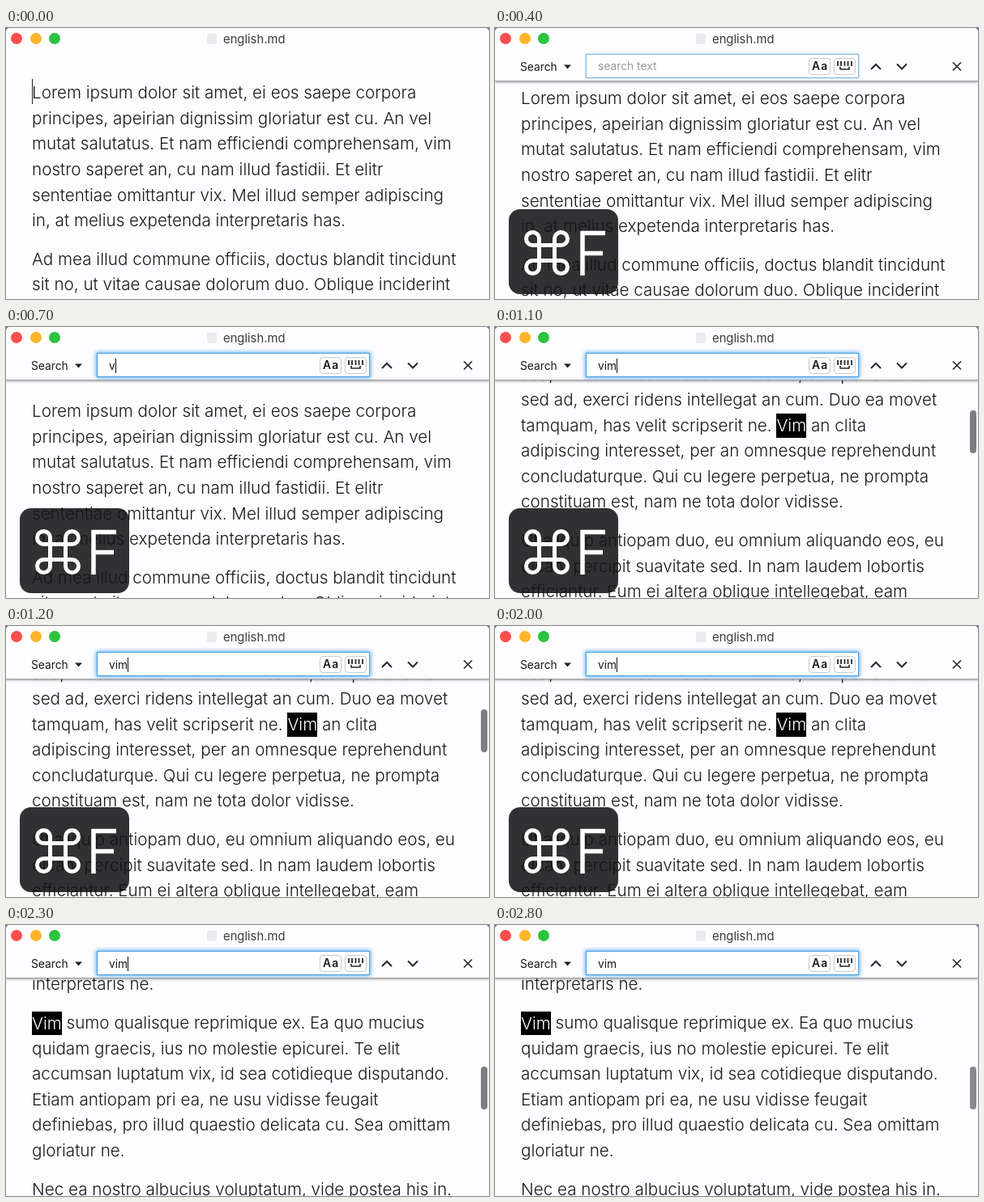
An HTML page for the animation above (2.9 s loop, 596x335 px).

```html
<!DOCTYPE html>
<html lang="en">
<head>
<meta charset="utf-8">
<title>english.md</title>
<style>
  html, body { margin: 0; width: 100%; height: 100%; overflow: hidden; background: #5f7894; }
  .window {
    position: relative; width: 596px; height: 335px; overflow: hidden;
    background: #fdfcfe; border-radius: 5px 5px 0 0;
    color: #19191b; font: 350 20.65px/31.55px Inter, sans-serif; font-optical-sizing: none;
  }
  .window * { box-sizing: border-box; }
  .abs, .page, .bar, .bar > *, .lights i { position: absolute; }
  svg { left: 0; top: 0; fill: none; overflow: visible; }

  /* One shared clock: every change is a hard step on a 100 ms grid. */
  .anim { animation: 2900ms step-end infinite; }

  .page { left: 32px; white-space: pre; }
  .page p { margin: 0 0 16.2px; }
  mark { background: #000; color: #fff; padding: 1.5px 0 3px; }
  .first { top: 64.4px; animation-name: first, push; }
  .second { top: 42.6px; animation-name: second; }
  .third { top: 57.4px; animation-name: third; }
  .cursor { left: 32px; top: 63px; width: 1px; height: 31px; background: #222; animation-name: before; }

  .head { left: 0; top: 0; width: 100%; height: 27px; background: #fdfcfe; }
  .lights i { top: 6.4px; width: 14px; height: 14px; border-radius: 50%; }
  .icon { left: 248px; top: 7px; width: 12px; height: 13px; border-radius: 2px; background: #ebeaec; }
  .title { left: 268px; top: 3.6px; font: 400 14.8px/20px Inter, sans-serif; color: #3b3a3d; }

  .bar {
    left: 0; top: 0; width: 100%; height: 66px; background: #fdfcfe;
    border-bottom: 1px solid #a3a2a5; box-shadow: 0 1px 3px #0006;
    font: 400 13.8px/20px Inter, sans-serif; white-space: pre;
    animation-name: after;
  }
  .label { left: 31px; top: 38px; }
  .field {
    left: 112px; top: 32px; width: 337px; height: 30px; padding: 5px 14px;
    background: #fff; border: 1px solid #4a9fe0; box-shadow: 0 0 5px 1px #58aef0;
    animation-name: focus;
  }
  .hint { left: 127px; top: 37px; color: #98979a; animation-name: hint; }
  .v { animation-name: v; }
  .i { animation-name: i; }
  .m { animation-name: m; }
  .caret {
    display: inline-block; width: 1px; height: 18px; vertical-align: -4px;
    background: #111; animation-name: blink;
  }
  .key {
    top: 37px; width: 27px; height: 21px; border: 1px solid #c9c8cb; border-radius: 4px;
    background: #fff; font-weight: 600; line-height: 19px; text-align: center;
    letter-spacing: 1.2px; text-indent: 1.2px;
  }

  .thumb { left: 586px; width: 8px; height: 53px; border-radius: 4px; background: #7e7d80; animation-name: thumb; }
  .keys { left: 17px; top: 224px; width: 135px; height: 105px; border-radius: 14px; background: #151517e0; animation-name: keys; }
  .keys svg { display: block; animation-name: glyph; }

  @keyframes before { 0% { visibility: visible } 10.34%, 100% { visibility: hidden } }
  @keyframes after { 0% { visibility: hidden } 10.34%, 100% { visibility: visible } }
  @keyframes first { 0% { visibility: visible } 37.93%, 100% { visibility: hidden } }
  @keyframes second { 0%, 79.31%, 100% { visibility: hidden } 37.93% { visibility: visible } }
  @keyframes third { 0% { visibility: hidden } 79.31%, 100% { visibility: visible } }
  @keyframes push {
    0% { transform: none }
    10.34% { transform: translateY(1px) }
    13.79% { transform: translateY(7px) }
    17.24% { transform: translateY(16px) }
    20.68% { transform: translateY(22px) }
    24.13%, 100% { transform: translateY(23.6px) }
  }
  @keyframes focus {
    0% { border-color: #b9cfe0; box-shadow: none }
    13.79% { border-color: #83b9e2; box-shadow: 0 0 3px #9fd0f5 }
    17.24%, 100% { border-color: #4a9fe0; box-shadow: 0 0 5px 1px #58aef0 }
  }
  @keyframes hint { 0%, 24.13%, 100% { visibility: hidden } 10.34% { visibility: visible } }
  @keyframes v { 0% { font-size: 0 } 24.13%, 100% { font-size: 13.8px } }
  @keyframes i { 0% { font-size: 0 } 27.58%, 100% { font-size: 13.8px } }
  @keyframes m { 0% { font-size: 0 } 31.03%, 100% { font-size: 13.8px } }
  @keyframes blink {
    0%, 51.72%, 86.2%, 100% { visibility: hidden }
    24.13%, 68.96% { visibility: visible }
  }
  @keyframes thumb {
    0% { top: 103px; opacity: 0 }
    37.93% { top: 103px; opacity: 1 }
    58.62% { top: 103px; opacity: .8 }
    62.06% { top: 103px; opacity: .45 }
    65.51% { top: 103px; opacity: .15 }
    68.96% { top: 103px; opacity: 0 }
    79.31% { top: 175px; opacity: 1 }
    96.55%, 100% { top: 175px; opacity: .9 }
  }
  @keyframes keys {
    0%, 79.31%, 100% { opacity: 0 }
    10.34% { opacity: 1 }
    72.41% { opacity: .64 }
    75.86% { opacity: .3 }
  }
  @keyframes glyph { 0% { opacity: 1 } 72.41% { opacity: .6 } 75.86%, 100% { opacity: .13 } }
</style>
</head>
<body>
<div class="window">
  <div class="page first anim"><p>Lorem ipsum dolor sit amet, ei eos saepe corpora
principes, apeirian dignissim gloriatur est cu. An vel
mutat salutatus. Et nam efficiendi comprehensam, vim
nostro saperet an, cu nam illud fastidii. Et elitr
sententiae omittantur vix. Mel illud semper adipiscing
in, at melius expetenda interpretaris has.</p><p>Ad mea illud commune officiis, doctus blandit tincidunt
sit no, ut vitae causae dolorum duo. Oblique inciderint</p></div>
  <div class="page second anim"><p>sea, cu nonumes vivendum mea no, semper duo no
sed ad, exerci ridens intellegat an cum. Duo ea movet
tamquam, has velit scripserit ne. <mark>Vim</mark> an clita
adipiscing interesset, per an omnesque reprehendunt
concludaturque. Qui cu legere perpetua, ne prompta
constituam est, nam ne tota dolor vidisse.</p><p>Ut aliquip antiopam duo, eu omnium aliquando eos, eu
dicant percipit suavitate sed. In nam laudem lobortis
efficiantur. Eum ei altera oblique intellegebat, eam</p></div>
  <div class="page third anim"><p>interpretaris ne.</p><p><mark>Vim</mark> sumo qualisque reprimique ex. Ea quo mucius
quidam graecis, ius no molestie epicurei. Te elit
accumsan luptatum vix, id sea cotidieque disputando.
Etiam antiopam pri ea, ne usu vidisse feugait
definiebas, pro illud quaestio delicata cu. Sea omittam
gloriatur ne.</p><p>Nec ea nostro albucius voluptatum, vide postea his in.</p></div>
  <div class="abs cursor anim"></div>

  <div class="bar anim">
    <span class="label">Search</span>
    <div class="field anim"><span class="v anim">v</span><span class="i anim">i</span><span class="m anim">m</span><span class="caret anim"></span></div>
    <span class="hint anim">search text</span>
    <span class="key" style="left:387px">Aa</span>
    <span class="key" style="left:418px"></span>
    <svg width="596" height="66" stroke="#29282b" stroke-width="2">
      <path d="M85 45.5h9l-4.5 5z" fill="#222" stroke="none"/>
      <path d="M423 41v6M427 41v6M431.5 41v6M435.5 41v6M440 41v6" stroke-width="1.8"/>
      <path d="M426 48v3h11v-3" stroke-width="1.6"/>
      <path d="M464 51l6-6 6 6M496 44.5l6 6 6-6"/>
      <path d="M565 42.5l10 10m0-10l-10 10" stroke-width="1.7"/>
    </svg>
  </div>

  <div class="abs head">
    <div class="lights">
      <i style="left:6.4px;background:#fc4f4b"></i>
      <i style="left:29.8px;background:#fdb52c"></i>
      <i style="left:53.2px;background:#2bc43f"></i>
    </div>
    <i class="abs icon"></i>
    <span class="abs title">english.md</span>
  </div>

  <div class="abs thumb anim"></div>
  <div class="abs keys anim">
    <svg class="anim" width="135" height="105" viewBox="17 224 135 105" stroke="#fff" stroke-width="5">
      <path d="M54.5 268.5H46.5A8 8 0 1 1 54.5 260.5V295.5A8 8 0 1 1 46.5 287.5H81.5A8 8 0 1 1 73.5 295.5V260.5A8 8 0 1 1 81.5 268.5Z"/>
      <path d="M108 306V253.5H136M108 278.5H133" stroke-width="5.5"/>
    </svg>
  </div>
</div>
</body>
</html>
```
